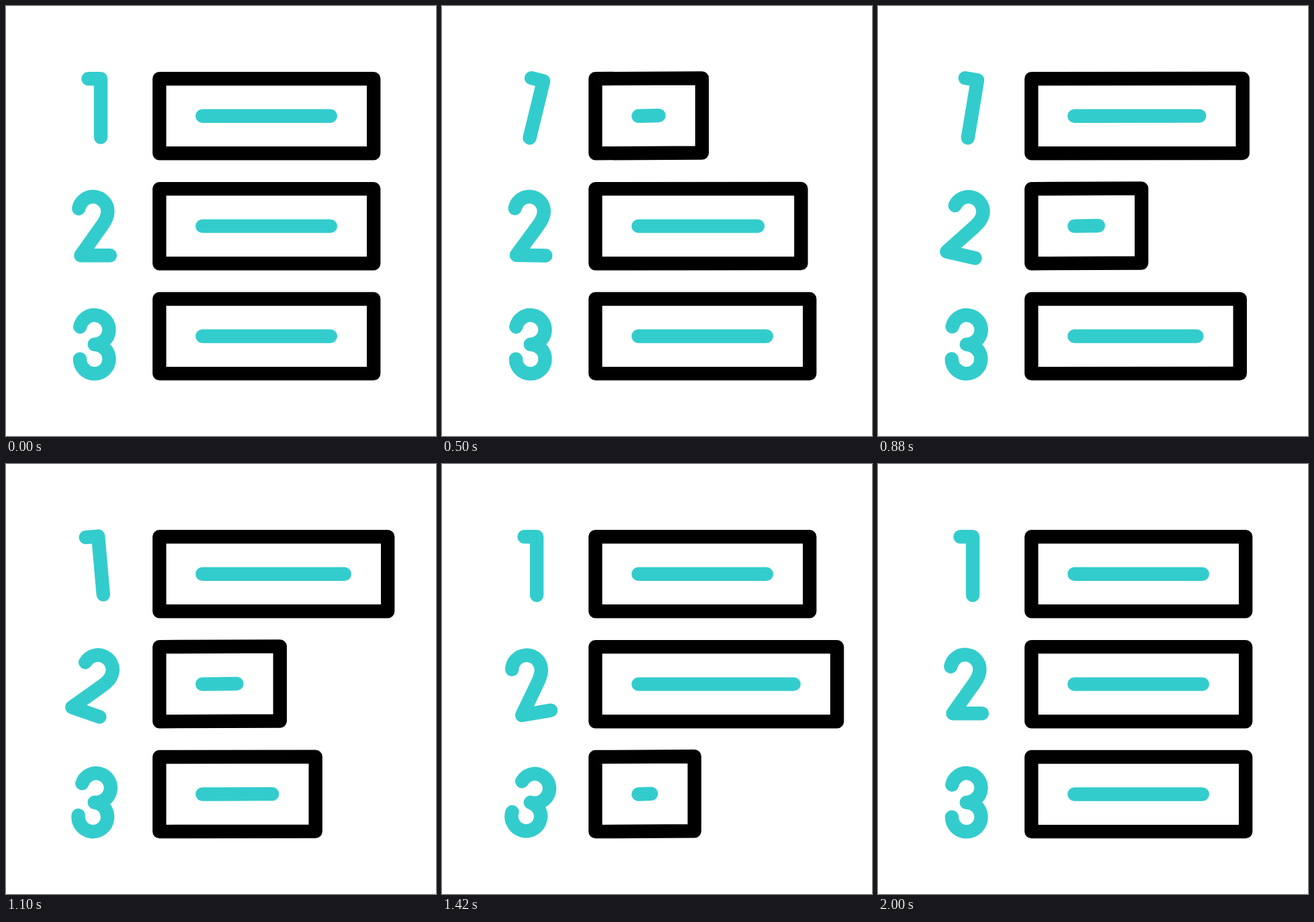
Animation, 640 px wide and 640 px high, one loop 2.22 s. Source, as an HTML page:

```html
<!DOCTYPE html>
<html lang="en">
<head>
<meta charset="utf-8">
<title>Ranked list</title>
<style>
  html, body { margin: 0; width: 100%; height: 100%; overflow: hidden; background: #fff; }
  svg { display: block; width: 100%; height: 100%; }
  path { fill: none; stroke-width: 20.4; stroke-linecap: round; stroke-linejoin: round; }
  .box { stroke: #000; }
  .accent { stroke: #33cccc; }
</style>
</head>
<body>
<svg id="stage" viewBox="0 0 640 640"></svg>
<script>
const LOOP = 2220, TICK = 20, DELAY = 400, PITCH = 163.9;
const LEFT = 228.3, RIGHT = 547.2, TOP = 108.2, HEIGHT = 111.1;
const DASH_LEFT = 292.3, DASH_RIGHT = 482.8;

// Keyframes as [time, value], eased by smoothstep between neighbours.
const STRETCH = [[0, 0], [600, -173], [1000, 42], [1200, 0]];
const LIFT = [[0, 0], [600, -0.8], [1000, 0]];
const TILT = [[0, 0], [800, 20], [1000, -10], [1200, 0]];

const DIGITS = [
  { d: "M122.4 108.2H141V195.3", pivot: "131.8 151.7" },
  { d: "M108.2 301.5A21.8 21.8 0 0 1 151.4 306C151.4 313 147.5 320.5 142.8 327L111.4 371.2H154.9", pivot: "131.7 327.7" },
  { d: "M110.3 477.5A21.8 21.8 0 1 1 131.7 503.7A21.8 21.8 0 1 1 109.9 525.5", pivot: "131.7 503.7" }
];

const stage = document.getElementById("stage");

function addPath(className, d = "") {
  const path = document.createElementNS("http://www.w3.org/2000/svg", "path");
  path.setAttribute("class", className);
  path.setAttribute("d", d);
  return stage.appendChild(path);
}

const rows = DIGITS.map(({ d, pivot }, i) => ({
  pivot,
  top: TOP + i * PITCH,
  delay: i * DELAY,
  digit: addPath("accent", d),
  box: addPath("box"),
  dash: addPath("accent")
}));

function valueAt(keys, t) {
  if (t <= keys[0][0]) return keys[0][1];
  const i = keys.findIndex(([time]) => t < time);
  if (i < 0) return keys[keys.length - 1][1];
  const [t0, v0] = keys[i - 1], [t1, v1] = keys[i];
  const s = (t - t0) / (t1 - t0);
  return v0 + (v1 - v0) * s * s * (3 - 2 * s);
}

function draw(time) {
  for (const { pivot, top, delay, digit, box, dash } of rows) {
    const t = time - delay;
    const dx = valueAt(STRETCH, t), dy = valueAt(LIFT, t);
    const bottom = top + HEIGHT, middle = top + HEIGHT / 2;
    box.setAttribute("d",
      `M${LEFT} ${top}L${RIGHT + dx} ${top + dy}L${RIGHT + dx} ${bottom + dy}L${LEFT} ${bottom}Z`);
    dash.setAttribute("d", `M${DASH_LEFT} ${middle}L${DASH_RIGHT + dx} ${middle + dy}`);
    digit.setAttribute("transform", `rotate(${valueAt(TILT, t)} ${pivot})`);
  }
}

const start = performance.now();

function frame(now) {
  const time = Math.max(0, now - start) % LOOP;
  draw(Math.floor(time / TICK) * TICK);
  requestAnimationFrame(frame);
}

draw(0);
requestAnimationFrame(frame);
</script>
</body>
</html>
```
